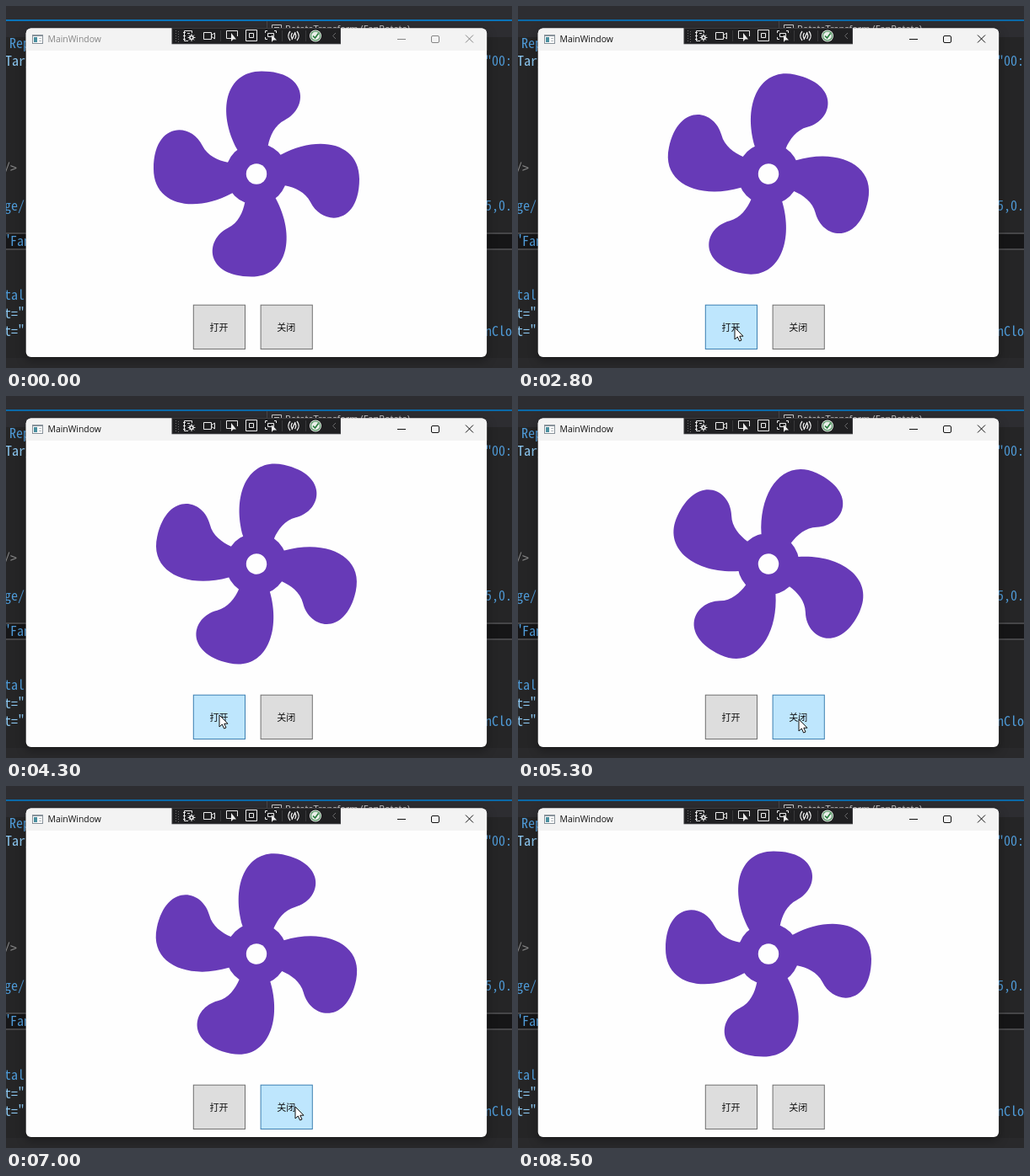
These frames come from a looping animation (600x430 px, 9.3 s). An HTML page with a canvas:

```html
<!DOCTYPE html>
<html lang="zh">
<head>
<meta charset="utf-8">
<style>
  html, body { margin: 0; width: 100%; height: 100%; overflow: hidden; background: #252526; }
  canvas { display: block; width: 600px; height: 430px; }
</style>
</head>
<body>
<canvas id="stage" width="600" height="430"></canvas>
<script>
const ctx = document.getElementById('stage').getContext('2d');
const LOOP = 9300, STEP = 100;
const CODE_FONT = '16px "Noto Sans Mono CJK SC", "Noto Sans Mono CJK JP", "Liberation Mono", monospace';
const UI_FONT = '"Open Sans", "Noto Sans", sans-serif';

// Keyframes: time in ms, then values
const SPIN = [[2017, 0], [2800, 282], [4300, 822.6], [5300, 1195], [7000, 1811.8], [7900, 2138.5]];
const POINTER = [[600, 606, 290], [1300, 257, 382], [3900, 257, 382], [4300, 253, 379],
  [4800, 253, 379], [5300, 333, 384], [5900, 333, 384], [6800, 343, 381], [7900, 343, 381], [8500, 480, 432]];
const ACTIVATE = 1900, STOP = 7900;

const BUTTONS = [
  { label: '打开', x: 221.8, pressAt: 1900 },
  { label: '关闭', x: 301.6, pressAt: 7800 },
];

const BLADE = 'M.5-10C5-10 5.11-6.43 2.75-5.25C1.76-4.76 1.32-3.71 1.13-2.78L0 0L-1.86-2.35C-3.85-6.04-3.06-10 .5-10Z';
const fan = new Path2D();
for (let i = 0; i < 4; i++) fan.addPath(new Path2D(BLADE), new DOMMatrix().rotate(i * 90));
const hub = new Path2D();
hub.arc(0, 0, 3, 0, Math.PI * 2);
fan.addPath(hub);

const arrow = new Path2D('M0 0V14L3.3 11L5.6 16L8 15L5.8 10.2H10Z');

function sample(keys, t) {
  if (t <= keys[0][0]) return keys[0].slice(1);
  for (let i = 1; i < keys.length; i++) {
    const [a, b] = [keys[i - 1], keys[i]];
    if (t < b[0]) {
      const k = (t - a[0]) / (b[0] - a[0]);
      return a.slice(1).map((v, j) => v + (b[j + 1] - v) * k);
    }
  }
  return keys[keys.length - 1].slice(1);
}

function rect(x, y, w, h, color) {
  ctx.fillStyle = color;
  ctx.fillRect(x, y, w, h);
}

function text(str, x, y, color, font, align = 'left') {
  ctx.font = font;
  ctx.textAlign = align;
  ctx.fillStyle = color;
  ctx.fillText(str, x, y);
}

function stroke(d, color, width = 1) {
  ctx.strokeStyle = color;
  ctx.lineWidth = width;
  ctx.stroke(new Path2D(d));
}

function disc(x, y, r, color) {
  ctx.fillStyle = color;
  ctx.beginPath();
  ctx.arc(x, y, r, 0, Math.PI * 2);
  ctx.fill();
}

function drawEditor(active) {
  rect(0, 0, 600, 430, '#252526');
  rect(0, 0, 600, 37, '#2d2d31');
  rect(0, 16, 600, 2, active ? '#0b69a8' : '#0a73b9');
  rect(309, 18, 1, 10, '#46464a');
  stroke('M315.5 30V22.5H326.5V30M318 25.5H324', '#c8c8c8');
  text('RotateTransform (FanRotate)', 331, 31, '#d0d0d0', '11px ' + UI_FONT);

  rect(0, 269, 600, 21, '#464648');
  rect(0, 271, 600, 17, '#161617');
  rect(0, 418, 600, 12, '#29292b');

  const blue = '#4f9bd8', pale = '#8cc8f2', gray = '#8a8a8a';
  const lines = [
    ['Rep', 4, 50, blue], ['Targ', -1, 71, pale], ['/>', -3, 198, gray],
    ['ge/', -2, 243, blue], ['"Fan', -3, 285, blue], ['tal', -2, 349, blue],
    ['t="', -2, 371, pale], ['t="', -2, 392, pale],
    ['"00:', 568, 71, blue], ['5,0.', 568, 243, blue], ['nClo', 568, 392, blue],
  ];
  for (const [str, x, y, color] of lines) text(str, x, y, color, CODE_FONT);
}

function drawWindow(active) {
  ctx.save();
  ctx.shadowColor = 'rgba(0,0,0,.35)';
  ctx.shadowBlur = 12;
  ctx.shadowOffsetY = 4;
  ctx.fillStyle = '#fefefe';
  ctx.beginPath();
  ctx.roundRect(23.7, 26.6, 546.4, 390.3, 6);
  ctx.fill();
  ctx.restore();

  ctx.fillStyle = '#f3f3f3';
  ctx.beginPath();
  ctx.roundRect(23.7, 26.6, 546.4, 26.4, [6, 6, 0, 0]);
  ctx.fill();

  rect(31, 34, 13, 11, '#88929a');
  rect(32, 36, 11, 8, '#fafafa');
  rect(33, 37, 4, 6, '#4a8f9f');
  rect(39, 38, 3, 1, '#b4bbc0');
  rect(39, 41, 3, 1, '#b4bbc0');

  const ink = active ? '#111' : '#858585';
  text('MainWindow', 49.5, 43, ink, '10.4px ' + UI_FONT);
  stroke('M464 39.5H474M506 35.5H512Q513.5 35.5 513.5 37V42Q513.5 43.5 512 43.5H506Q504.5 43.5 504.5 42V37Q504.5 35.5 506 35.5ZM545 34.5L554 43.5M554 34.5L545 43.5', ink);
}

function drawToolbar() {
  rect(196.5, 26, 200.5, 19.3, '#3a3a3d');
  rect(197.5, 27, 198.5, 17.3, '#1f1f21');
  for (let y = 29; y < 43; y += 3) {
    rect(201, y, 1, 1, '#707070');
    rect(204, y + 1, 1, 1, '#707070');
  }
  for (const x of [254, 327, 355]) rect(x, 29, 1, 13, '#39393b');

  const white = '#ededed';
  // Page with gear, and camera
  stroke('M220.5 32V29.5H211.5V41.5H216M210 31.5H213M210 35.5H213M210 39.5H213M215 32.5H218', white);
  stroke('M220 33V42M215.5 37.5H224.5M217 34.5L223 40.5M223 34.5L217 40.5', white);
  disc(220, 37.5, 2.7, white);
  disc(220, 37.5, 1.2, '#1f1f21');
  stroke('M234.5 31.5H243.5V39.5H234.5ZM244 34.5L247.5 32V39L244 36.5', white);
  // Selection tools
  stroke('M267 38.5H261.5V29.5H274.5V36', white);
  ctx.fillStyle = white;
  ctx.fill(new Path2D('M267 32V42L269.5 39.5H273Z'));
  stroke('M284.5 28.5H297.5V41.5H284.5ZM288.5 32.5H293.5V37.5H288.5Z', white);
  stroke('M307.5 32V29.5H310M318 29.5H320.5V32M307.5 37V39.5H310M310.5 32.5H317.5V36.5H310.5Z', white);
  ctx.fill(new Path2D('M315 34V43L317 40.5H321Z'));
  // Reload and check
  stroke('M337 30Q332.5 35.5 337 41M339.5 32Q337 35.5 339.5 39M345 30Q349.5 35.5 345 41M342.5 32Q345 35.5 342.5 39M343 31L339 40', white, 1.3);
  disc(367, 35.5, 7, '#e9efe9');
  disc(367, 35.5, 6, '#39834a');
  disc(367, 35.5, 5, '#e9efe9');
  stroke('M364 35.5L366.5 38L370.5 32.5', '#267b3b', 1.6);
  stroke('M391 32L387.5 35.5L391 39', '#68686a');
}

function drawFan(angle) {
  ctx.save();
  ctx.translate(297, 199.5);
  ctx.rotate(angle * Math.PI / 180);
  ctx.scale(12.2, 12.2);
  ctx.fillStyle = '#673ab7';
  ctx.fill(fan);
  disc(0, 0, 1, '#fefefe');
  ctx.restore();
}

function drawButton({ label, x, pressAt }, px, py, t) {
  const hover = px >= x && px < x + 62 && py >= 355 && py < 408;
  const pressed = hover && t >= pressAt && t < pressAt + STEP;
  rect(x, 354.7, 62.2, 53.3, pressed ? '#2c628b' : hover ? '#3c7fb1' : '#707070');
  rect(x + 1, 355.7, 60.2, 51.3, pressed ? '#c4e5f6' : hover ? '#bee6fd' : '#dddddd');
  text(label, x + 30.7, 386, '#111', '11px "Noto Sans CJK SC", "Noto Sans CJK", sans-serif', 'center');
}

function drawPointer(x, y) {
  ctx.save();
  ctx.translate(x, y);
  ctx.fillStyle = '#fff';
  ctx.fill(arrow);
  ctx.strokeStyle = '#111';
  ctx.lineWidth = 1;
  ctx.stroke(arrow);
  ctx.restore();
}

function draw(t) {
  const active = t >= ACTIVATE;
  const [x, y] = sample(POINTER, t);
  drawEditor(active);
  drawWindow(active);
  drawToolbar();
  drawFan(t < STOP ? sample(SPIN, t)[0] : 0);
  for (const button of BUTTONS) drawButton(button, x, y, t);
  drawPointer(x, y);
}

const start = performance.now();
function tick() {
  const t = (performance.now() - start) % LOOP;
  draw(Math.floor(t / STEP) * STEP);
  requestAnimationFrame(tick);
}
tick();
</script>
</body>
</html>
```
